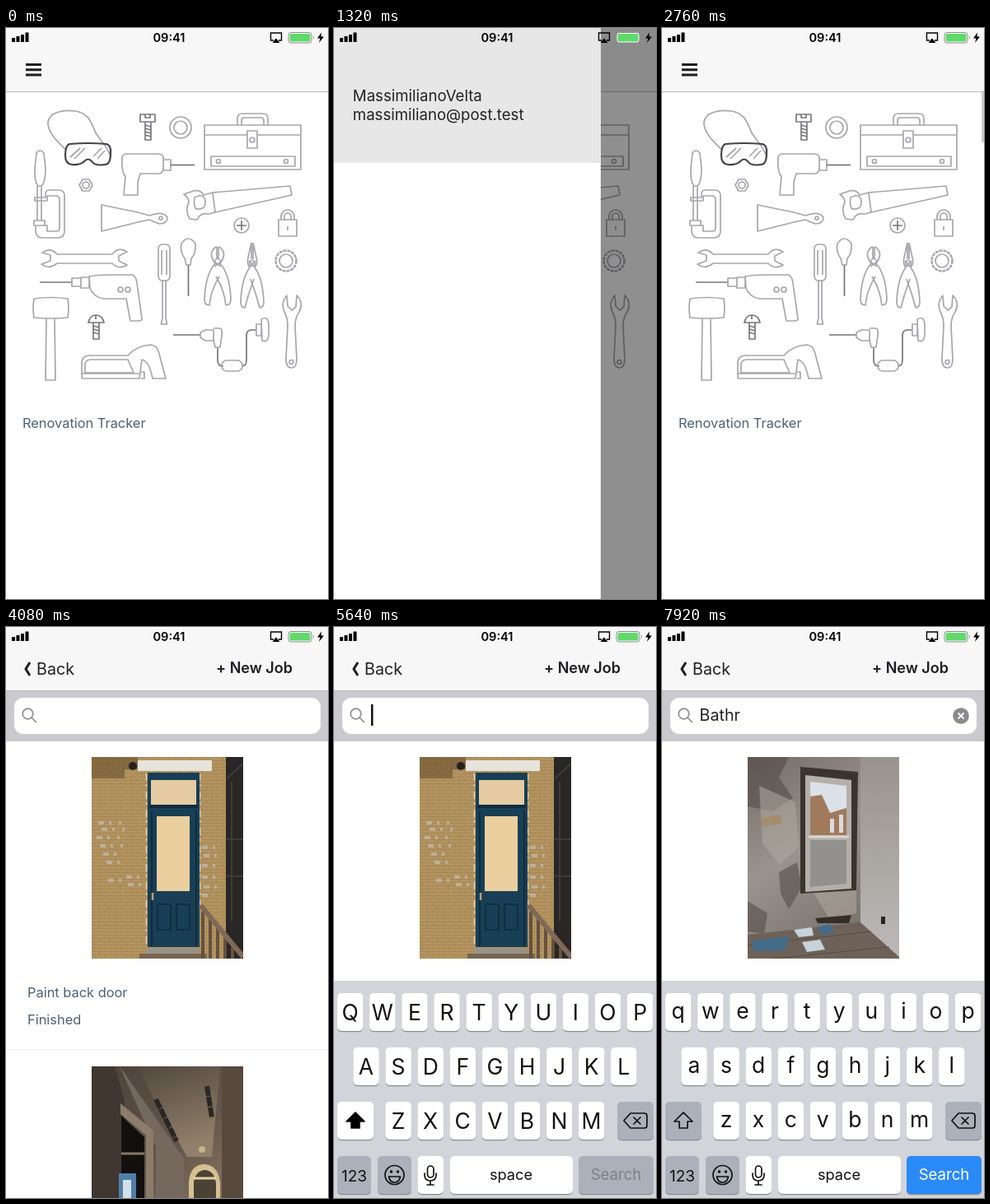
Animation of 391 by 694 pixels, one loop 8 s. Source, as an HTML page:

```html
<!DOCTYPE html>
<html lang="en">
<head>
<meta charset="utf-8">
<title>Job list demo</title>
<style>
  html, body { margin: 0; width: 100%; height: 100%; overflow: hidden; background: #fff; }
  svg { display: block; width: 100%; height: 100%; }
  text { font-family: Inter, Roboto, sans-serif; white-space: pre; }
  .line { fill: none; stroke: #a6a6ac; stroke-width: 1.7; stroke-linejoin: round; }
  .dark { stroke: #77777c; }
  .bold { stroke: #444448; stroke-width: 2.2; }
  .label { font-size: 16.4px; fill: #4b6276; }
  .mid { text-anchor: middle; }
  .icon { fill: none; stroke: #111; stroke-width: 1.7; stroke-linejoin: round; stroke-linecap: round; }
</style>
</head>
<body>
<svg viewBox="0 0 391 694">
  <defs>
    <pattern id="bricks" width="13" height="8" patternUnits="userSpaceOnUse">
      <path d="M0 .5H13M0 4.5H13M3 .5V4.5M9 4.5V8" stroke="#8d7040" stroke-width=".8" opacity=".45"/>
    </pattern>
    <linearGradient id="hall" x2=".7" y2="1">
      <stop offset="0" stop-color="#4b4139"/><stop offset=".55" stop-color="#63574b"/><stop offset="1" stop-color="#98866c"/>
    </linearGradient>
    <linearGradient id="ceiling" x2=".3" y2="1">
      <stop offset="0" stop-color="#51473f"/><stop offset="1" stop-color="#92816a"/>
    </linearGradient>
    <linearGradient id="plaster" x2=".5" y2="1">
      <stop offset="0" stop-color="#716b64"/><stop offset=".5" stop-color="#99948d"/><stop offset="1" stop-color="#77716a"/>
    </linearGradient>
    <linearGradient id="sideWall" x2="0" y2="1">
      <stop offset="0" stop-color="#98938c"/><stop offset="1" stop-color="#bcb9b8"/>
    </linearGradient>
    <clipPath id="photoClip"><path d="M0 0H184V245H0Z"/></clipPath>
    <filter id="soft" x="-30%" y="-30%" width="160%" height="160%">
      <feDropShadow dx="0" dy="1" stdDeviation="4" flood-opacity=".3"/>
    </filter>

    <g id="door" clip-path="url(#photoClip)">
      <path fill="#b39460" d="M0 0H184V245H0Z"/>
      <path fill="#82683f" d="M0 0H56V15H40V26H0Z"/>
      <path fill="url(#bricks)" d="M0 0H164V245H0Z"/>
      <g fill="none" stroke="#c0b8aa" stroke-width="4" stroke-dasharray="7 6 3 9 5 4" opacity=".8">
        <path d="M8 80H36M12 88H40M6 98H34M10 108H38M14 118H38M18 128H34M20 150H40M42 146H62M44 155H60"/>
        <path d="M134 110H152M136 120H154M134 132H150M134 146H152M136 158H154M134 168H148"/>
      </g>
      <path fill="#292725" d="M163 0H184V245H163Z"/>
      <path d="M164 26L184 8M170 30V200M164 100H184M164 145H184" stroke="#47423c" stroke-width="1.5"/>
      <circle cx="50" cy="11" r="5" fill="#24221f"/>
      <path fill="#e6e3dd" d="M56 4H146V17H56Z"/>
      <path d="M66.500 20V230M131.500 20V180" stroke="#d8cdb5" stroke-width="1.700" stroke-dasharray="9 4 3 6"/>
      <path fill="#183f55" d="M68 19H131V231H68Z"/>
      <path fill="#0d2d40" d="M70 58H129V62H70ZM72 66H74V230H72ZM126 66H128V230H126Z"/>
      <path fill="#e5cba2" d="M72 28H127V58H72Z"/>
      <path fill="#ebcf9f" d="M79 72H119V163H79Z"/>
      <path d="M80 179H96V210H80ZM103 179H119V210H103Z" fill="none" stroke="#0c2b3d" stroke-width="1.500"/>
      <path d="M74 165V174" stroke="#b9a078" stroke-width="2.500"/>
      <path fill="#9b9287" d="M66 232H130V240H66Z"/>
      <path fill="#766651" d="M58 239H140V245H58Z"/>
      <path d="M135 188V245M144 197V245M153 208V245M162 220V245M171 231V245" stroke="#66513f" stroke-width="4"/>
      <path d="M132 180L184 243" stroke="#806a56" stroke-width="6"/>
    </g>

    <g id="hallway" clip-path="url(#photoClip)">
      <path fill="url(#hall)" d="M0 0H184V245H0Z"/>
      <path fill="url(#ceiling)" d="M56 0H156L146 110H116L75 38Z"/>
      <path fill="#75695d" d="M34 0L112 112V245H78V98Z"/>
      <path fill="#403730" d="M0 0H28L40 42V245H0Z"/>
      <path fill="#8b7c6b" d="M35 45L75 78V245H66V84L35 58Z"/>
      <path fill="#12100f" d="M36 60L64 86V245H36Z"/>
      <path fill="#4f7fa9" d="M33 130H54V245H33Z"/>
      <path fill="#d3e0e8" d="M38 138H48V245H38Z"/>
      <path d="M36 106H64" stroke="#85786a" stroke-width="3"/>
      <path d="M78 40L103 91M140 24L146 62" stroke="#2c2622" stroke-width="6" stroke-dasharray="12 1"/>
      <path fill="#57493c" d="M158 0H184V245H158Z"/>
      <path fill="#d6bf91" d="M118 245V140Q120 119 137 119Q154 120 156 142V245Z"/>
      <path fill="#4a4234" d="M124 245V140Q127 126 138 126Q149 127 151 142V245Z"/>
      <path d="M124 136H151" stroke="#e3d2a6" stroke-width="3"/>
      <circle cx="134" cy="101" r="4" fill="#c9b38a"/>
    </g>

    <g id="bathroom" clip-path="url(#photoClip)">
      <path fill="url(#plaster)" d="M0 0H184V245H0Z"/>
      <path fill="#504a44" opacity=".55" d="M0 0H50L38 25L55 50L30 66L0 60ZM38 140L60 128L66 158L50 185L40 166ZM0 175L24 190L20 215L0 212Z"/>
      <path fill="#b0aaa1" opacity=".55" d="M14 35L58 55L62 110L38 130L18 105ZM80 165L132 160V190L100 198Z"/>
      <path fill="#a68658" opacity=".6" d="M14 75L40 70L42 81L18 84Z"/>
      <path fill="url(#sideWall)" d="M137 0H184V245L137 203Z"/>
      <path fill="#3a342f" d="M64 12L134 18L132 162L64 166Z"/>
      <path fill="#b3afa9" d="M70 22L126 28V160L70 164Z"/>
      <path fill="#dbe1e6" d="M76 30L120 35V95H76Z"/>
      <path fill="#a17a5e" d="M76 48L90 46L100 68L120 62V95H76Z"/>
      <path fill="#d8dade" d="M100 75H105V92H100ZM111 70H116V92H111Z"/>
      <path fill="#93918d" d="M76 101H120V154L76 158Z"/>
      <path d="M74 97H123" stroke="#d9d6d0" stroke-width="3"/>
      <path fill="#332e2a" d="M82 196L126 192L123 202H85Z"/>
      <path fill="#6e6258" d="M0 216L137 201L184 243V245H0Z"/>
      <path d="M0 229L150 212M30 245L172 231" stroke="#554b43"/>
      <path fill="#426c8a" d="M4 224L50 218L46 235L8 236ZM84 207L100 203L106 213L90 216Z"/>
      <path fill="#c7d2da" d="M56 210L78 207L80 217L62 219ZM66 225L88 222L94 234L72 237Z"/>
      <path fill="#282422" d="M162 194H167V203H162Z"/>
    </g>
  </defs>

  <path fill="#fff" d="M0 0H391V694H0Z"/>

  <g id="home">
    <path fill="#f7f7f8" d="M0 0H391V77H0Z"/><path stroke="#b5b5b8" d="M0 77.500H391"/>
    <path d="M24 44.500H43M24 50.800H43M24 57H43" stroke="#1d1d1f" stroke-width="3"/>
    <g class="line" id="tools">
      <path d="M73 148C62 138 50 126 51 114C53 102 70 99 84 101C104 104 104 120 110 129C116 138 124 146 126 154"/>
      <path class="bold" d="M77 141Q100 139 122 141Q128 143 127 152Q127 166 120 166Q108 168 104 162Q100 157 95 162Q90 167 80 166Q72 165 72 155Q72 143 77 141Z"/>
      <path d="M78 157L90 146M83 159L96 146M106 156L116 146M111 159L120 149"/>
      <path class="dark" d="M163 105H181V114H163ZM169 114V136H176V114M169 118L176 120M169 122L176 124M169 126L176 128M169 130L176 132M169 105V109H175V105"/>
      <circle cx="212" cy="121" r="13"/><circle cx="212" cy="121" r="8"/>
      <path d="M241 118H358V172H241ZM241 130H293M305 130H358M281 118V110Q281 104 287 104H312Q318 104 318 110V118M286 118V112Q286 109 289 109H310Q313 109 313 112V118M293 125H305V146H293ZM249 156H351V168H249Z"/>
      <circle cx="299" cy="136" r="3"/><circle cx="258" cy="162" r="2.500"/><circle cx="340" cy="162" r="2.500"/>
      <path d="M141 157Q142 153 147 153H184Q190 153 191 157V170Q191 176 186 177H163L160 187V203H143L145 180Q140 176 141 157ZM191 160H200V173H191Z"/>
      <path class="dark" d="M200 166.500H229"/>
      <path d="M37 152Q41 146 46 152L48 170Q48 188 43 192H39Q34 186 35 170ZM38 192V234M43 192V234M35 206H48V201Q48 197 53 197H64Q71 197 71 204V247Q71 254 64 255H43Q36 254 36 246V240H50V247H61Q65 247 65 243V209Q65 204 60 204H50V210H35ZM34 234H47V240H34Z"/>
      <path d="M89 191L93 184H101L105 191L101 198H93Z"/><circle cx="97" cy="191" r="4"/>
      <path d="M116 215L160 224L174 228Q190 222 196 230Q196 238 186 238L174 233L160 236L116 247Z"/><circle cx="188" cy="231" r="2"/>
      <path d="M251 200L345 192L347 203L254 224L246 226Q236 224 232 233L223 232Q217 222 222 212Q222 206 216 202L228 198Q236 196 240 203ZM251 200L254 224M229 206Q240 200 242 210Q243 220 234 220Q227 222 229 206Z"/>
      <circle cx="286" cy="240" r="9"/><path class="dark" d="M280 240H292M286 234V246"/>
      <path d="M331 233H353V253H331ZM334 233V229a8 8 0 0 1 16 0V233M338 233V229a4 4 0 0 1 8 0V233M342 241V246"/>
      <path d="M44 273L54 276V283L43 287Q52 294 62 286H129Q137 294 147 288L137 283V277L147 272Q137 265 129 275H62Q54 266 44 273Z"/>
      <rect x="185" y="263" width="14" height="44" rx="5"/><path d="M190 307V352L188.500 360H195.500L194 352V307M189 270V300M195 270V300"/>
      <path d="M213 262Q221 250 230 262Q231 274 225 280L224 288H219L217 280Q211 272 213 262Z"/><path class="dark" d="M221.500 288V326"/>
      <circle cx="340" cy="283" r="12.500" stroke-dasharray="4 1" style="stroke-width:2.500"/><circle cx="340" cy="283" r="8"/>
      <path class="dark" d="M41 309H80"/>
      <path d="M80 304H91V314H80ZM91 303H101V316H91ZM101 302Q110 300 125 300H153Q158 301 159 310L165 353Q165 356 161 356H151Q149 345 146 329H118Q106 327 102 316Z"/>
      <circle cx="139" cy="318" r="3"/><circle cx="148" cy="318" r="3"/>
      <path d="M34 329Q54 326 75 329Q77 340 75 352Q54 354 34 352Q32 340 34 329ZM49 353L48 428H60L59 353"/>
      <path class="dark" d="M100 358Q102 349 109 349Q117 349 119 358ZM106 358V378H113V358M106 362L113 364M106 366L113 368M106 370L113 372M109 349V354"/>
      <path d="M92 426V408Q92 398 102 398H148Q158 386 176 385Q184 386 186 396L194 426H178Q174 405 165 403L162 426H92M96 419V410Q96 403 103 403H148L155 419ZM92 420H162M164 418H168V426H164"/>
      <path class="dark" d="M203 373H236M257 388V404Q257 411 264 411M286 411Q292 411 292 404V374Q292 367 298 367H304"/>
      <path d="M236 370L242 367H252V380H242L236 376ZM252 365H260Q263 366 262 374L260 388H254L252 380M304 360H310V374H304ZM310 354Q320 348 319 366Q320 384 311 380Z"/><rect x="262" y="404" width="25" height="13" rx="6"/>
      <path d="M341 325Q333 334 338 345Q342 352 342 362L340 402Q340 413 347 413Q353 413 353 402L351 362Q351 352 356 345Q362 334 353 325L352 339L347 343L342 338Z"/><circle cx="346.500" cy="406" r="2.500"/>
    </g>
    <text class="label" x="20" y="485.500">Renovation Tracker</text>
  </g>

  <path id="dim" d="M0 0H391V694H0Z"/>
  <g id="drawer">
    <path fill="#fff" d="M0 0H324V694H0Z"/><path fill="#e7e7e7" d="M0 0H324V164H0Z"/>
    <g font-size="18.600" fill="#222"><text x="23" y="89">MassimilianoVelta</text><text x="23" y="112">massimiliano@post.test</text></g>
  </g>

  <g id="jobs">
    <path fill="#fff" d="M0 0H391V694H0Z"/>
    <path fill="#f7f7f8" d="M0 0H391V77H0Z"/><path stroke="#b5b5b8" d="M0 77.500H391"/>
    <path d="M29 43L24 51L29 59" fill="none" stroke="#1d1d1f" stroke-width="3"/>
    <text x="37" y="57.500" font-size="19.700" fill="#222">Back</text>
    <text x="255" y="56" font-size="18" font-weight="600" fill="#1d1d1f">+ New Job</text>
    <path fill="#c9c9ce" d="M0 78H391V139H0Z"/>
    <rect x="10" y="86" width="372" height="44" rx="11" fill="#fff"/>
    <g fill="none" stroke="#8e8e93" stroke-width="1.700"><circle cx="26.500" cy="105.500" r="6.300"/><path d="M31 110L37 116"/></g>
    <text id="query" x="45.500" y="114" font-size="19.700" fill="#222"></text>
    <path id="caret" fill="#111" d="M0 94H2.500V120H0Z"/>
    <g id="clear"><circle cx="363" cy="108" r="9.800" fill="#8a8a8f"/><path d="M359.500 104.500L366.500 111.500M366.500 104.500L359.500 111.500" stroke="#fff" stroke-width="1.800"/></g>
    <g id="allCards">
      <use href="#door" x="104" y="158"/>
      <text class="label" x="26" y="450">Paint back door</text><text class="label" x="26" y="483">Finished</text>
      <path stroke="#ececef" d="M0 513.500H391"/>
      <use href="#hallway" x="104" y="534"/>
    </g>
    <use id="match" href="#bathroom" x="104" y="158"/>
  </g>

  <g id="keyboard"></g>

  <g id="status">
    <path d="M7 12H11V17H7ZM12.500 10H16.500V17H12.500ZM18 8H22V17H18ZM23.500 5.500H27.500V17H23.500Z"/>
    <text class="mid" x="198" y="17" font-size="14.600" font-weight="600">09:41</text>
    <path d="M325 15H321.500V6H334.500V15H331" fill="none" stroke="#000" stroke-width="1.400"/><path d="M323.500 18L328 12.500L332.500 18Z"/>
    <rect x="343" y="5.500" width="28" height="12.500" rx="3" fill="#fff" stroke="#88888c"/><rect x="344.500" y="7" width="25" height="9.500" rx="1.500" fill="#5fd96b"/>
    <path d="M373 9.500Q375 11.700 373 14Z" fill="#88888c"/><path d="M383 5.500L378 12.500H381.500L380 18L386 10.500H382.500Z"/>
  </g>
</svg>
<script>
const LOOP = 8000, DRAWER_WIDTH = 324, GREY = '#abb0ba';
const DRAWER_OPEN = 720, DRAWER_CLOSE = 1496, PUSH = 2760, LOADED = 3400, FOCUS = 5100, FILTERED = 7500;
const strokes = [['B', 5880, 5980], ['a', 6240, 6340], ['t', 6600, 6700], ['h', 6900, 7000], ['r', 7140, 7260]];
const rows = [['qwertyuiop', 4, 445], ['asdfghjkl', 23.3, 511], ['zxcvbnm', 62.3, 577]];
const $ = id => document.getElementById(id);
const show = (id, on) => $(id).setAttribute('visibility', on ? 'visible' : 'hidden');
const slide = (id, x, y) => $(id).setAttribute('transform', `translate(${x} ${y})`);
const clamp = p => Math.min(1, Math.max(0, p));
const easeOut = p => 1 - (1 - clamp(p)) ** 3;
const spring = ms => { const x = Math.max(0, ms) * .017; return 1 - (1 + x) * Math.exp(-x); };

const keyCap = (x, y, w, fill = '#fff') =>
  `<rect x="${x}" y="${y + 1.3}" width="${w}" height="46" rx="5" fill="#898c91"/>
   <rect x="${x}" y="${y}" width="${w}" height="46" rx="5" fill="${fill}"/>`;
const caption = (x, y, size, text, fill = '#111') =>
  `<text class="mid" x="${x}" y="${y}" font-size="${size}" fill="${fill}">${text}</text>`;
const keys = rows.flatMap(([letters, x, y]) => [...letters].map((letter, i) => ({ letter, x: x + i * 39.1, y })));

function popup(char) {
  const { x, y } = keys.find(k => k.letter === char.toLowerCase());
  return `<g transform="translate(${x + 15.8} ${y})">
    <path filter="url(#soft)" fill="#fff" d="M-20-78H20Q32-78 32-66V-28C32-12 16-14 16 0V41Q16 46 11 46H-11Q-16 46-16 41V0C-16-14-32-12-32-28V-66Q-32-78-20-78Z"/>
    ${caption(0, -25, 43, char)}</g>`;
}

function drawKeyboard(caps, pressed) {
  const letters = keys.map(({ letter, x, y }) => keyCap(x, y, 31.5) +
    caption(x + 15.7, y + (caps ? 32.5 : 30.5), 26.5, caps ? letter.toUpperCase() : letter)).join('');
  return `<path fill="#d2d4da" d="M0 430H391V694H0Z"/>${letters}
    ${keyCap(4, 577, 44, caps ? '#fff' : GREY)}
    <path class="icon" ${caps ? 'style="fill:#000"' : ''} d="M26 590L37 601H31V609H21V601H15Z"/>
    ${keyCap(344, 577, 44, GREY)}
    <path class="icon" d="M352 600L360 591H377Q380 591 380 594V606Q380 609 377 609H360ZM364 596L372 604M372 596L364 604"/>
    ${keyCap(4, 643, 41, GREY)}${caption(24.5, 674, 19, '123')}
    ${keyCap(53, 643, 41, GREY)}
    <circle class="icon" cx="73.500" cy="666" r="11.500"/><path class="icon" d="M66.500 668H80.500Q79 675 73.500 675Q68 675 66.500 668Z"/>
    <circle cx="69.500" cy="662" r="1.700"/><circle cx="77.500" cy="662" r="1.700"/>
    ${keyCap(101.5, 643, 31.5)}
    <rect class="icon" x="113.500" y="655" width="7.500" height="14" rx="3.700"/><path class="icon" d="M110 664V666Q110 673 117 673Q124 673 124 666V664M117 673V678M113 678H121"/>
    ${keyCap(141, 643, 149)}${caption(215, 672, 18.2, 'space')}
    ${keyCap(297, 643, 91, caps ? GREY : '#2a8af8')}${caption(342.5, 672, 18.6, 'Search', caps ? '#7d8187' : '#fff')}
    ${pressed ? popup(pressed) : ''}`;
}

const pliers = (x, y, half) => [1, -1].map(side => `<path transform="translate(${x} ${y}) scale(${side} 1)" d="${half}"/>`).join('');
$('tools').insertAdjacentHTML('beforeend',
  pliers(257, 266, 'M-1 0Q-5 1-7 6Q-9 12-3 20Q-15 34-16 64Q-16 71-10 71Q-8 52 2 36M-1 0V14M-4 18L4 24') +
  pliers(299, 261, 'M-1 0L-5 18Q-7 25-3 30Q-13 44-14 72Q-14 79-9 79Q-4 60 2 44M-1 0V20M-4 22L4 30') +
  '<circle cx="257" cy="284" r="3.500"/><circle cx="299" cy="286" r="3.500"/>');

let keyboardState;
function render(t) {
  const open = t < DRAWER_CLOSE ? spring(t - DRAWER_OPEN) : 1 - spring(t - DRAWER_CLOSE);
  slide('drawer', (open - 1) * DRAWER_WIDTH, 0);
  // The shade is complete before the drawer is and clears before it has left.
  $('dim').setAttribute('opacity', .44 * clamp((open - .05) / .5));

  const pushed = easeOut((t - PUSH) / 400);
  show('home', pushed < 1);
  slide('jobs', 391 * (1 - pushed), 0);
  show('allCards', t >= LOADED && t < FILTERED);
  show('match', t >= FILTERED);

  const done = strokes.filter(s => t >= s[2]);
  const query = done.map(s => s[0]).join('');
  const pressed = strokes.find(s => t >= s[1] && t < s[2])?.[0];
  const lastInput = done.length ? done[done.length - 1][2] : FOCUS;
  $('query').textContent = query;
  $('caret').setAttribute('transform', `translate(${45 + (query ? $('query').getComputedTextLength() : 0)} 0)`);
  show('caret', t >= FOCUS && (t - lastInput) % 1000 < 600);
  show('clear', query);

  const state = `${!query}${pressed}`;
  if (state !== keyboardState) $('keyboard').innerHTML = drawKeyboard(!query, pressed);
  keyboardState = state;
  slide('keyboard', 0, 264 * (1 - easeOut((t - FOCUS) / 400)));
}

const start = performance.now();
function tick() {
  render((performance.now() - start) % LOOP);
  requestAnimationFrame(tick);
}
tick();
</script>
</body>
</html>
```
